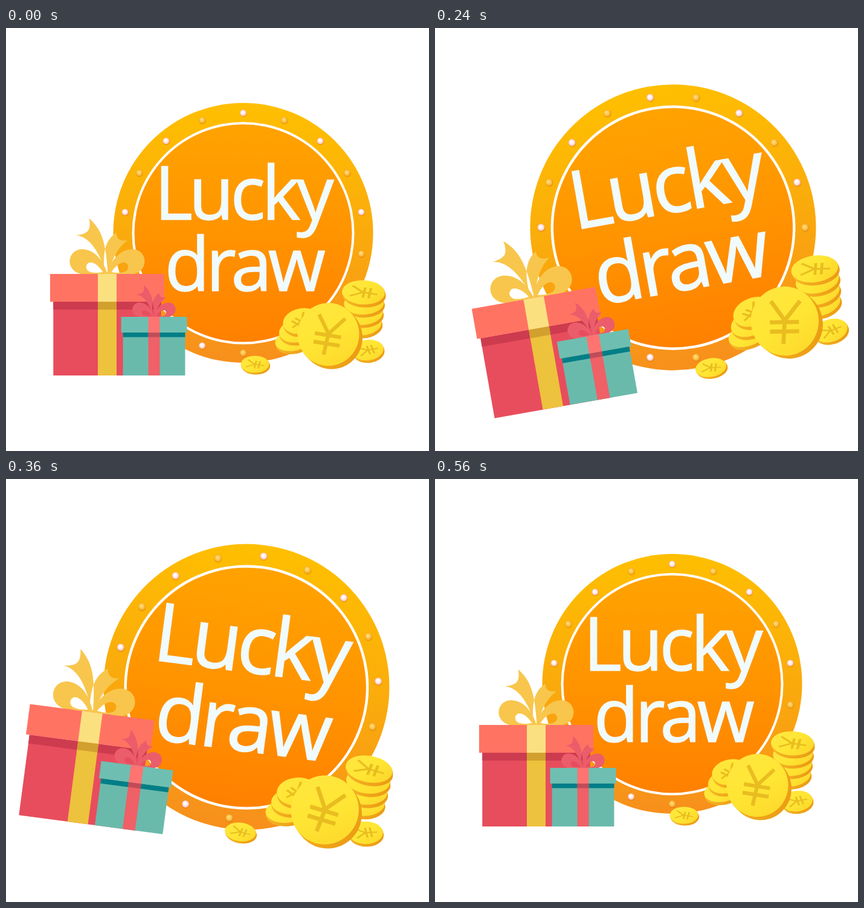
These frames come from a looping animation (700x700 px, 3 s). An HTML page with a canvas:

```html
<!DOCTYPE html>
<html lang="en">
<head>
<meta charset="utf-8">
<title>Lucky draw</title>
<style>
  html, body { margin: 0; width: 100%; height: 100%; overflow: hidden; background: #fff; }
  canvas { display: block; width: 700px; height: 700px; }
</style>
</head>
<body>
<canvas id="stage" width="700" height="700"></canvas>
<script>
const ctx = document.getElementById('stage').getContext('2d');
const LOOP = 3000, STEP = 40, MID = 280, TAU = Math.PI * 2;
const DISC = { x: 392.5, y: 339, r: 215 };

const clamp = p => Math.min(1, Math.max(0, p));
const ease = p => (1 - Math.cos(Math.PI * clamp(p))) / 2;
const lerp = (a, b, p) => a + (b - a) * p;

// Grow, swing left, swing right, settle, shrink: mirrored in time around MID
function pose(t) {
  const away = Math.abs(t - MID);
  const swing = away < 40 ? Math.sin(Math.PI * away / 80) : ease((160 - away) / 120);
  return {
    scale: 1 + 0.1 * ease((MID - away) / 120),
    angle: Math.sign(t - MID) * swing * Math.PI / 18
  };
}

function rect(x1, y1, x2, y2, fill) {
  ctx.fillStyle = fill;
  ctx.fillRect(x1, y1, x2 - x1, y2 - y1);
}

function ellipse(x, y, rx, ry, tilt, fill) {
  ctx.beginPath();
  ctx.ellipse(x, y, rx, ry, tilt, 0, TAU);
  ctx.fillStyle = fill;
  ctx.fill();
}

const circle = (x, y, r, fill) => ellipse(x, y, r, r, 0, fill);

function blend(gradient, ...colors) {
  colors.forEach((c, i) => gradient.addColorStop(i / (colors.length - 1), c));
  return gradient;
}

const linear = (x1, y1, x2, y2, ...colors) =>
  blend(ctx.createLinearGradient(x1, y1, x2, y2), ...colors);

function bulb(x, y, pink) {
  const glow = ctx.createRadialGradient(x - 1, y - 1.5, 0.5, x, y, 5.5);
  const colors = pink ? ['#fff', '#ffeeea', '#f7b3ac'] : ['#ffdc7c', '#ffca55', '#f0a52a'];
  circle(x + 0.5, y + 1.2, 5.8, 'rgba(205,110,10,0.35)');
  circle(x, y, 5.4, blend(glow, ...colors));
}

function disc() {
  const { x, y, r } = DISC;
  circle(x, y, r, linear(0, y - r, 0, y + r, '#ffbf00', '#faab0c', '#f78f1c'));
  circle(x, y + 0.5, 184, '#fff');
  circle(x, y + 0.5, 180, linear(0, y - 180, 0, y + 180, '#ffa300', '#ff9400', '#ff8000'));
  for (let i = 0; i < 18; i++) {
    const a = i * TAU / 18;
    bulb(x + 198.5 * Math.sin(a), y - 198.5 * Math.cos(a), i % 2 === 0);
  }
}

function label(text, x, y) {
  ctx.font = '400 122px "Open Sans", "Noto Sans", sans-serif';
  ctx.letterSpacing = '-6.2px';
  ctx.lineJoin = 'miter';
  ctx.lineWidth = 1.5;
  ctx.fillStyle = ctx.strokeStyle = '#f1fafc';
  ctx.fillText(text, x, y);
  ctx.strokeText(text, x, y);
}

// Bow parts, drawn around the knot
const BOW_LOOP = new Path2D(
  'M1 1 C-6 -22 -20 -40 -41 -41 C-58 -41 -66 -25 -60 -12 C-54 0 -38 3 -27 0 Z ' +
  'M-7 -3 C-13 -13 -22 -20 -29 -19 C-36 -17 -37 -8 -30 -4 C-22 -1 -14 -2 -7 -3 Z');
const BOW_TAILS = new Path2D(
  'M-30 -92 C-9 -74 -2 -52 1 0 H-2 C-8 -22 -24 -62 -52 -64 Q-38 -65 -32 -71 Q-27 -78 -30 -92 Z ' +
  'M15 -68 C-4 -56 -8 -34 -4 0 H3 C8 -28 20 -46 34 -56 Q16 -52 15 -68 Z');

function bow(x, y, size, fill) {
  ctx.save();
  ctx.translate(x, y);
  ctx.scale(size, size);
  ctx.fillStyle = fill;
  ctx.fill(BOW_TAILS);
  ctx.fill(BOW_LOOP, 'evenodd');
  ctx.scale(-1, 1);
  ctx.fill(BOW_LOOP, 'evenodd');
  ctx.restore();
}

// Colours run from lid to body to the shadow under the lid
function layers(x1, x2, inset, top, lid, shade, colors) {
  rect(x1 + inset, top + lid, x2 - inset, 575, colors[1]);
  rect(x1 + inset, top + lid, x2 - inset, top + lid + shade, colors[2]);
  rect(x1, top, x2, top + lid, colors[0]);
}

function gift(x, w, top, lid, shade, ribbon, box, band, knot) {
  const mid = x + w / 2;
  bow(mid, top, w / 189, knot);
  layers(x, x + w, w * 0.028, top, lid, shade, box);
  layers(mid - ribbon / 2, mid + ribbon / 2, 0, top, lid, shade, band);
}

function gifts() {
  gift(73, 189, 407, 46, 13, 31,
    ['#ff7363', '#e84d5d', '#cd3b4f'], ['#fbe080', '#edc23d', '#d2a02e'], '#f8c64c');
  gift(190.5, 109, 478, 26, 7.5, 19,
    ['#6ebfb1', '#6abaac', '#007e87'], ['#ff7471', '#ef6067', '#c04c58'], '#eb5d6a');
}

// Currency mark on a unit disc
function yen(turn) {
  ctx.rotate(turn);
  ctx.beginPath();
  ctx.moveTo(-0.4, -0.58);
  ctx.lineTo(0, -0.02);
  ctx.lineTo(0.46, -0.58);
  ctx.moveTo(0, -0.02);
  ctx.lineTo(-0.05, 0.66);
  for (const y of [0.03, 0.3]) {
    ctx.moveTo(-0.44, y);
    ctx.lineTo(0.42, y);
  }
  ctx.strokeStyle = '#e9bd20';
  ctx.lineWidth = 0.12;
  ctx.stroke();
}

function coin(x, y, rx, ry, tilt, dx, dy, turn) {
  const edge = linear(x - rx, y, x + rx, y + ry, '#f5bb27', '#f1a81d', '#ea9a12');
  for (let i = 8; i > 0; i--) {
    ellipse(x + dx * i / 8, y + dy * i / 8, rx, ry, tilt, edge);
  }
  ellipse(x, y, rx, ry, tilt, linear(x - rx / 2, y - ry, x + rx / 2, y + ry, '#ffe63e', '#ffe634', '#fdd92c'));
  if (turn === undefined) return;
  ctx.save();
  ctx.translate(x, y);
  ctx.rotate(tilt);
  ctx.scale(rx, ry);
  yen(turn);
  ctx.restore();
}

// Coins piled from a low one up to a high one; only the highest shows its mark
function pile(n, low, high, tilt, turn) {
  for (let i = 0; i < n; i++) {
    const p = i / (n - 1);
    const [x, y, rx, ry] = low.map((v, k) => lerp(v, high[k], p));
    coin(x, y, rx, ry, lerp(-0.2, tilt, p), 1.5, 5, i === n - 1 ? turn : undefined);
  }
}

function coins() {
  coin(412, 556.5, 23.5, 14, 0, 1.5, 3, -1.4);
  coin(599, 533, 26, 17, -0.12, 1.5, 4, -1.75);
  pile(4, [594, 491, 28, 17], [591.5, 437.5, 35.5, 20], 0.04, -1.45);
  pile(3, [477, 516, 32, 18], [489, 485, 31, 21], -0.2, 0.9);
  coin(533.5, 507, 51, 52, 0.1, 5.5, 5.5, 0.06);
}

function draw(t) {
  const { scale, angle } = pose(t);
  ctx.setTransform(1, 0, 0, 1, 0, 0);
  rect(0, 0, 700, 700, '#fff');
  ctx.translate(350, 350);
  ctx.rotate(angle);
  ctx.scale(scale, scale);
  ctx.translate(-350, -350);
  disc();
  label('Lucky', 245.5, 317);
  label('draw', 262.5, 435);
  gifts();
  coins();
}

const start = performance.now();
function tick() {
  const t = (performance.now() - start) % LOOP;
  draw(Math.floor(t / STEP) * STEP);
  requestAnimationFrame(tick);
}
tick();
</script>
</body>
</html>
```
